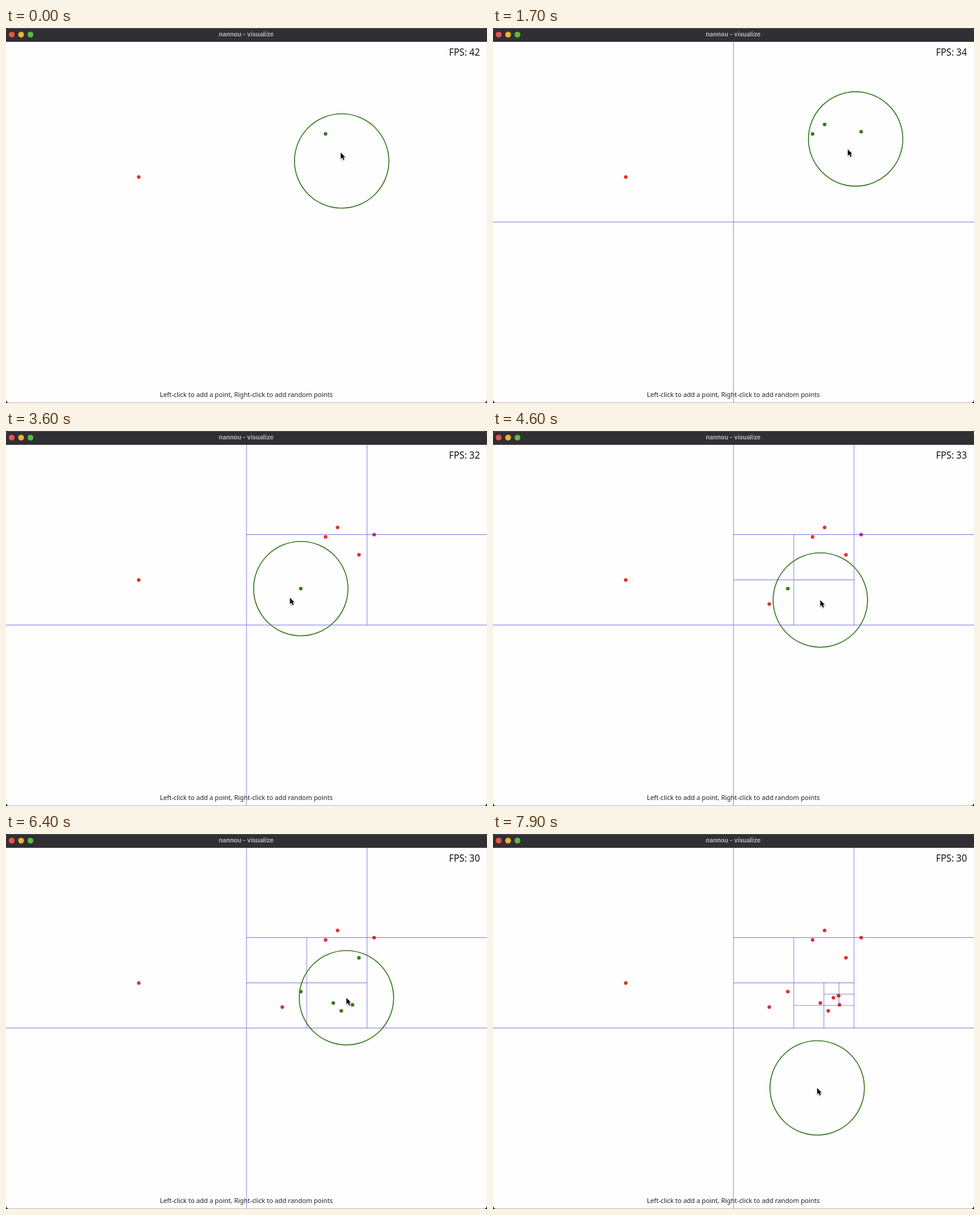
These frames come from a looping animation (800 px wide and 624 px high, 8 s). An HTML page with a canvas:

```html
<!DOCTYPE html>
<html lang="en">
<head>
<meta charset="utf-8">
<title>Quadtree</title>
<style>
  html, body { margin: 0; width: 100%; height: 100%; overflow: hidden; background: #fefefe; }
  canvas { display: block; }
</style>
</head>
<body>
<canvas width="800" height="624"></canvas>
<script>
const ctx = document.querySelector('canvas').getContext('2d');
const LOOP = 8000, RADIUS = 78.5, CAPACITY = 3;
const RED = '#e0312b', GREEN = '#357a1e', LINE = 'rgba(62, 52, 200, 0.55)';

// The mouse glides from stop to stop and clicks in the middle of each rest.
const stop = (x, y, arrive, leave, clicks = 1) => ({ x, y, arrive, leave, clicks });
const stops = [
  stop(558.3, 221.2, 0, 0, 0),
  stop(551.5, 160.5, 3.2, 4),
  stop(612.3, 172.5, 8, 9.9),
  stop(587, 206, 12.6, 18),
  stop(490.3, 262.2, 24, 30),
  stop(459.5, 288, 31.8, 35),
  stop(544.4, 281.3, 39, 41.5),
  stop(557.6, 294.2, 43, 45),
  stop(576.3, 284.2, 50, 53),
  stop(566.2, 272.5, 56, 64),
  stop(574.7, 269, 65.8, 68, 2),
  stop(539.2, 422.5, 73, 75, 0),
];

const points = [{ x: 220.8, y: 248, tick: 0 }, { x: 531.5, y: 176.2, tick: 0 }];
for (const { x, y, arrive, leave, clicks } of stops) {
  for (let i = 0; i < clicks; i++) points.push({ x, y, tick: (arrive + leave) / 2 });
}

function mouseAt(tick) {
  const i = stops.findIndex(s => s.leave >= tick);
  const to = stops[i], from = stops[i - 1] ?? to;
  if (tick >= to.arrive) return [to.x, to.y];
  const u = (tick - from.leave) / (to.arrive - from.leave);
  const eased = u * u * (3 - 2 * u);
  return [from.x + (to.x - from.x) * eased, from.y + (to.y - from.y) * eased];
}

// Settles at 30, with a short recovery around tick 39.
function fpsAt(tick) {
  return Math.round(30 + 12 * Math.exp(-tick / 11) + 2.7 * Math.exp(-(((tick - 39) / 8) ** 2)));
}

function disc(x, y, r, color) {
  ctx.fillStyle = color;
  ctx.beginPath();
  ctx.arc(x, y, r, 0, 2 * Math.PI);
  ctx.fill();
}

function label(text, x, y, font, color, align) {
  ctx.font = font;
  ctx.fillStyle = color;
  ctx.textAlign = align;
  ctx.fillText(text, x, y);
}

function drawTree(inside, cx, cy, halfW, halfH) {
  if (inside.length <= CAPACITY) return;
  ctx.strokeStyle = LINE;
  ctx.lineWidth = 1.1;
  ctx.beginPath();
  ctx.moveTo(cx - halfW, cy);
  ctx.lineTo(cx + halfW, cy);
  ctx.moveTo(cx, cy - halfH);
  ctx.lineTo(cx, cy + halfH);
  ctx.stroke();
  for (const sx of [-1, 1]) {
    for (const sy of [-1, 1]) {
      const part = inside.filter(p => (p.x >= cx) === (sx > 0) && (p.y >= cy) === (sy > 0));
      drawTree(part, cx + sx * halfW / 2, cy + sy * halfH / 2, halfW / 2, halfH / 2);
    }
  }
}

const arrow = new Path2D('M0 0V10.4L2.4 8.2L4.2 12.2L6 11.4L4.3 7.6H7.4Z');

function drawCursor(x, y) {
  ctx.save();
  ctx.translate(x, y + 0.2);
  ctx.shadowColor = 'rgba(0, 0, 0, 0.35)';
  ctx.shadowBlur = 2;
  ctx.shadowOffsetY = 1;
  ctx.strokeStyle = '#fff';
  ctx.lineWidth = 1.4;
  ctx.stroke(arrow);
  ctx.shadowColor = 'transparent';
  ctx.fillStyle = '#000';
  ctx.fill(arrow);
  ctx.restore();
}

function drawTitleBar() {
  ctx.fillStyle = '#302f33';
  ctx.fillRect(0, 0, 800, 23);
  ctx.fillStyle = '#57565a';
  ctx.fillRect(0, 0, 800, 1);
  ['#f0504b', '#f4b12e', '#5dba3d'].forEach((color, i) => disc(9.5 + 15.6 * i, 11, 4.8, color));
  label('nannou - visualize', 399.5, 14.3, '700 10.2px Inter, sans-serif', '#b3b2b5', 'center');
}

function draw(time) {
  // The picture holds still from 100 to 800 ms.
  const tick = time < 100 ? 0 : Math.max(1, Math.floor(time / 100) - 6);
  const [x, y] = mouseAt(tick);
  const placed = points.filter(p => p.tick <= tick);

  ctx.fillStyle = '#1c1c1e';
  ctx.fillRect(0, 0, 800, 624);
  ctx.save();
  ctx.beginPath();
  ctx.roundRect(0, 0, 800, 624, 6);
  ctx.clip();
  ctx.fillStyle = '#fefefe';
  ctx.fillRect(0, 0, 800, 624);

  label('FPS: ' + fpsAt(tick), 788.2, 45.5, '15.4px "Noto Sans", sans-serif', '#111', 'right');
  label('Left-click to add a point, Right-click to add random points', 399.8, 613.6,
    '10.76px "Noto Sans", sans-serif', '#222', 'center');

  for (const p of placed) {
    disc(p.x, p.y, 3, Math.hypot(p.x - x, p.y - y) < RADIUS ? GREEN : RED);
  }
  drawTree(placed, 400, 322.9, 401, 301);

  ctx.strokeStyle = GREEN;
  ctx.lineWidth = 1.6;
  ctx.beginPath();
  ctx.arc(x, y, RADIUS, 0, 2 * Math.PI);
  ctx.stroke();

  drawTitleBar();
  drawCursor(...mouseAt(tick + 1));
  ctx.fillStyle = '#bbb';
  ctx.fillRect(0, 623, 800, 1);
  ctx.restore();
}

const start = performance.now();
function frame() {
  draw((performance.now() - start) % LOOP);
  requestAnimationFrame(frame);
}
frame();
</script>
</body>
</html>
```
